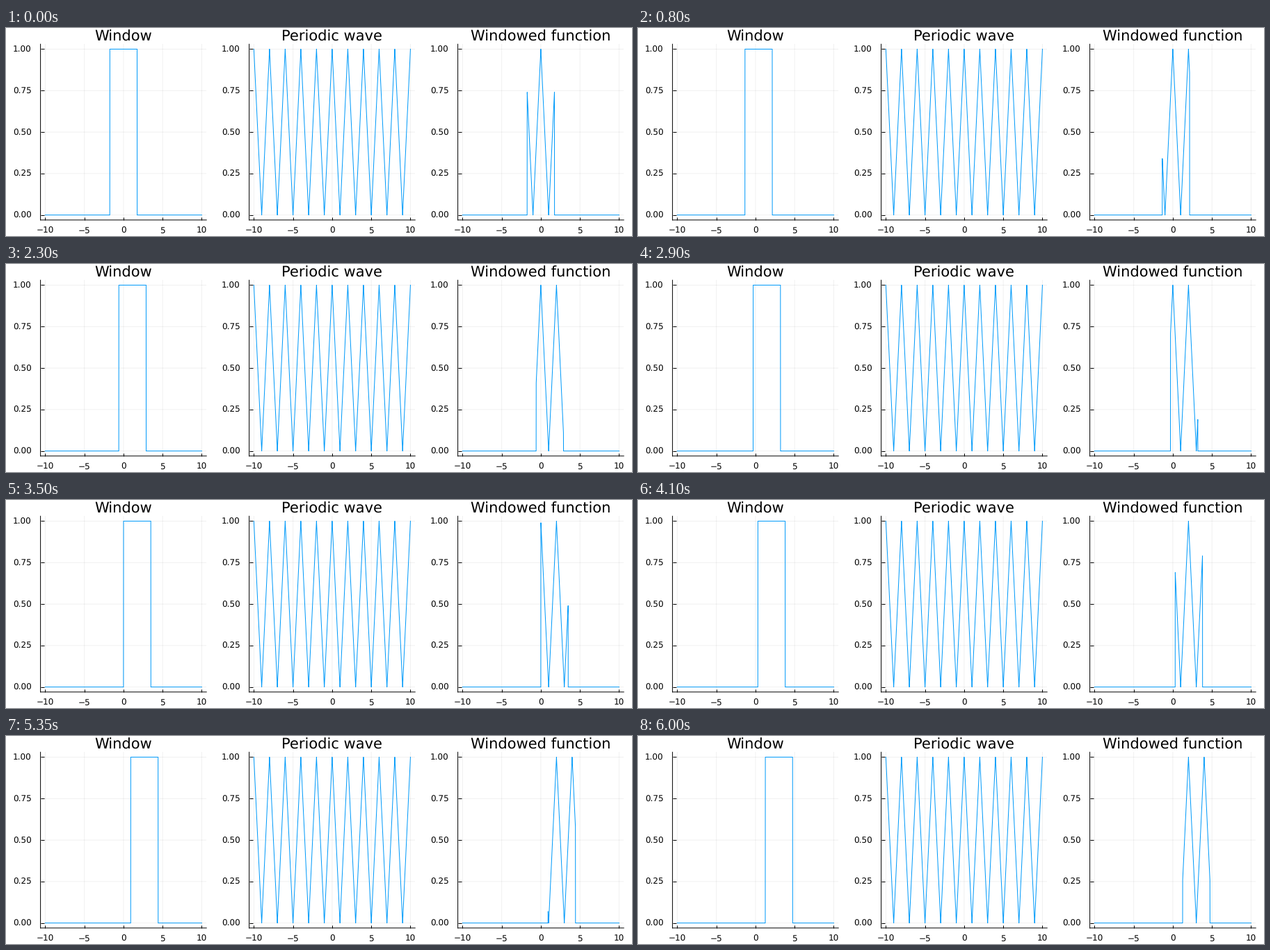
A matplotlib script for the animation above (6.05 s loop, 900 by 300 pixels).

```python
import matplotlib.pyplot as plt
import numpy as np
from matplotlib.animation import FuncAnimation

W, H, DPI = 900, 300, 100
PX = 72 / DPI                      # one pixel in points
FRAMES, INTERVAL = 121, 50
BLUE = "#009afa"

LEFT, TOP, RIGHT, BOTTOM = 49.6, 23.3, 288.2, 276.9
PANEL = 300
HALF_WIDTH = 1750                  # window half width, in thousandths
STEP = 25                          # window shift per frame, in thousandths

plt.rcParams.update({
    "font.family": "DejaVu Sans",
    "text.hinting": "none",
    "path.snap": False,
    "path.simplify": False,
})

grid = np.arange(-10000, 10001, 10)
x = grid / 1000
wave = np.abs((x + 1) % 2 - 1)
wave = 1 - wave

fig = plt.figure(figsize=(W / DPI, H / DPI), dpi=DPI, facecolor="white")


def label(px, py, text, size, ha="center"):
    fig.text(px / W, 1 - py / H, text, fontsize=size * PX,
             ha=ha, va="baseline", color="black")


def make_panel(index, title):
    x0 = LEFT + index * PANEL
    width, height = RIGHT - LEFT, BOTTOM - TOP
    ax = fig.add_axes([x0 / W, 1 - BOTTOM / H, width / W, height / H],
                      facecolor="none")
    ax.set(xlim=(-10.6, 10.6), ylim=(-0.03, 1.03),
           xticks=np.arange(-10, 11, 5), yticks=np.arange(0, 1.01, 0.25))
    ax.set_axisbelow(True)
    ax.grid(color="black", alpha=0.06, linewidth=PX)
    ax.tick_params(direction="in", length=4.5 * PX, width=PX,
                   labelbottom=False, labelleft=False)
    ax.spines[["top", "right"]].set_visible(False)
    ax.spines[["left", "bottom"]].set_linewidth(PX)

    for v in range(-10, 11, 5):
        px = x0 + (v + 10.6) / 21.2 * width
        label(px, 295.4, str(v).replace("-", "\u2212"), 12)
    for v in np.arange(0, 1.01, 0.25):
        py = BOTTOM - (v + 0.03) / 1.06 * height
        label(x0 - 13, py + 4.4, f"{v:.2f}", 12, ha="right")
    label(x0 + width / 2, 18.5, title, 21)

    line, = ax.plot(x, wave, color=BLUE, linewidth=PX)
    return line


window_line = make_panel(0, "Window")
make_panel(1, "Periodic wave")
product_line = make_panel(2, "Windowed function")


def update(i):
    window = (np.abs(grid - i * STEP) < HALF_WIDTH).astype(float)
    window_line.set_ydata(window)
    product_line.set_ydata(window * wave)
    return window_line, product_line


anim = FuncAnimation(fig, update, frames=FRAMES, interval=INTERVAL,
                     repeat=True, repeat_delay=0)
plt.show()
```
